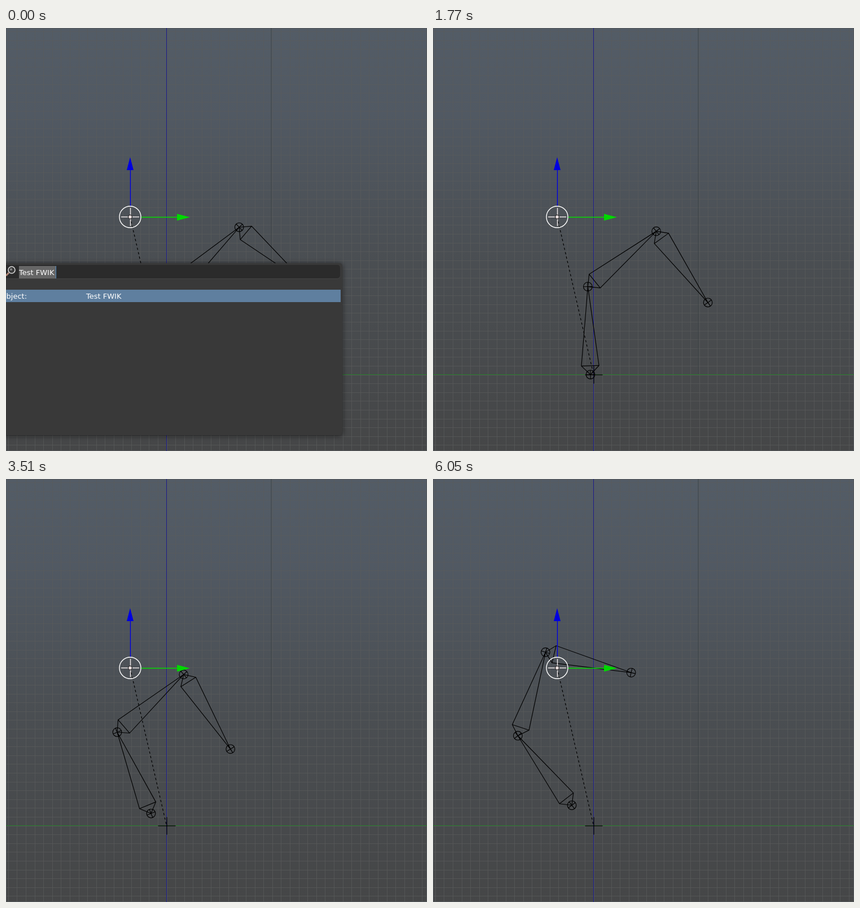
An HTML page with a canvas for the animation above (6410 ms loop, 746x750 px).

```html
<!DOCTYPE html>
<html lang="en">
<head>
<meta charset="utf-8">
<title>Armature solver</title>
<style>
  html, body { margin: 0; width: 100%; height: 100%; overflow: hidden; background: #4b4f54; }
  canvas { display: block; }
</style>
</head>
<body>
<canvas id="stage" width="746" height="750"></canvas>
<script>
const W = 746, H = 750, LOOP = 6410, BONE = 156, UNIT = 15.6;
const ORIGIN = { x: 284.5, y: 614.5 };
const TARGET = { x: 220, y: 335 };
const FONT = '13px "DejaVu Sans", sans-serif';
const ctx = document.getElementById('stage').getContext('2d');

// The picture refreshes in bursts: start, end, number of updates.
const BURSTS = [
  [320, 900, 6], [1010, 1650, 7], [1770, 2320, 6], [2460, 2990, 6], [3110, 3510, 5],
  [3650, 4290, 7], [4390, 4950, 6], [5070, 5620, 6], [5740, 6050, 4]
];
const TICKS = BURSTS.flatMap(([a, b, n]) =>
  Array.from({ length: n }, (_, i) => Math.round((a + (b - a) * i / (n - 1)) / 10) * 10));

// time, root x, root y, then the three bone angles in degrees
const POSES = [
  [320, 285, 615, -84.8, -43, 40.2],
  [780, 285, 615, -86, -42, 42.7],
  [1770, 279, 614.5, -91.7, -39, 54.1],
  [2460, 271, 610, -99.2, -37.5, 60.2],
  [3510, 257, 593, -112.6, -41, 57.9],
  [4290, 249, 581, -120.5, -50.6, 42],
  [4850, 245.5, 577.5, -125.2, -62.9, 24.2],
  [5620, 246, 578.5, -127.8, -71.7, 13.4]
];
// time, x, y
const POINTER = [
  [4290, -4, 446], [4850, 64, 428], [4950, 66, 428], [5620, 97, 414], [5950, 138, 355]
];

function slope(keys, i, c) {
  const a = keys[i - 1], b = keys[i + 1];
  return a && b ? (b[c] - a[c]) / (b[0] - a[0]) : 0;
}

// Cubic Hermite through the keys, at rest at both ends.
function sample(keys, t) {
  const last = keys.length - 1;
  if (t <= keys[0][0]) return keys[0].slice(1);
  if (t >= keys[last][0]) return keys[last].slice(1);
  const i = keys.findIndex(k => k[0] > t) - 1;
  const a = keys[i], b = keys[i + 1], d = b[0] - a[0];
  const u = (t - a[0]) / d, u2 = u * u, u3 = u2 * u;
  return a.slice(1).map((v, n) => {
    const c = n + 1;
    return v * (2 * u3 - 3 * u2 + 1) + b[c] * (3 * u2 - 2 * u3) +
      d * (slope(keys, i, c) * (u3 - 2 * u2 + u) + slope(keys, i + 1, c) * (u3 - u2));
  });
}

function line(color, ...p) {
  ctx.strokeStyle = color;
  ctx.beginPath();
  for (let i = 0; i < p.length; i += 2) ctx.lineTo(p[i], p[i + 1]);
  ctx.stroke();
}

function shape(color, ...p) {
  ctx.fillStyle = color;
  ctx.beginPath();
  for (let i = 0; i < p.length; i += 2) ctx.lineTo(p[i], p[i + 1]);
  ctx.closePath();
  ctx.fill();
}

function disc(x, y, r, stroke, fill) {
  ctx.beginPath();
  ctx.arc(x, y, r, 0, Math.PI * 2);
  if (fill) { ctx.fillStyle = fill; ctx.fill(); }
  if (stroke) { ctx.strokeStyle = stroke; ctx.stroke(); }
}

function panel(x, y, w, h, r, fill) {
  ctx.fillStyle = fill;
  ctx.beginPath();
  ctx.roundRect(x, y, w, h, r);
  ctx.fill();
}

function drawViewport() {
  const g = ctx.createLinearGradient(0, 0, 0, H);
  g.addColorStop(0, '#535c66');
  g.addColorStop(0.2, '#515963');
  g.addColorStop(0.55, '#4a4e52');
  g.addColorStop(1, '#454647');
  ctx.fillStyle = g;
  ctx.fillRect(0, 0, W, H);

  ctx.lineWidth = 1;
  const grid = 'rgba(90,92,92,0.7)';
  for (let k = -18; k <= 29; k++) {
    const x = Math.round(ORIGIN.x + k * UNIT) + 0.5;
    line(grid, x, 0, x, H);
  }
  for (let k = -39; k <= 8; k++) {
    const y = Math.round(ORIGIN.y + k * UNIT) + 0.5;
    line(grid, 0, y, W, y);
  }
  ctx.strokeStyle = '#55595c';
  ctx.strokeRect(0.5, 0.5, W - 1, H - 1);
  line('#3f4447', 470, 0, 470, ORIGIN.y);
  line('#277a2b', 0, ORIGIN.y, W, ORIGIN.y);
  line('#1b1b8e', ORIGIN.x, 0, ORIGIN.x, H);
}

function drawBall(x, y, angle) {
  const r = BONE * 0.05, c = Math.cos(angle) * r, s = Math.sin(angle) * r;
  disc(x, y, r, '#000');
  line('#000', x - c, y - s, x + c, y + s);
  line('#000', x + s, y - c, x - s, y + c);
}

function drawArm(t) {
  let [x, y, ...angles] = sample(POSES, t);
  angles = angles.map(a => a * Math.PI / 180);
  ctx.lineWidth = 1.15;
  drawBall(x, y, angles[0]);
  for (const a of angles) {
    const c = Math.cos(a), s = Math.sin(a), w = BONE * 0.1;
    const lx = x + (c + s) * w, ly = y + (s - c) * w;
    const rx = x + (c - s) * w, ry = y + (s + c) * w;
    const ex = x + c * BONE, ey = y + s * BONE;
    line('#000', x, y, lx, ly, ex, ey, rx, ry, x, y);
    line('#000', lx, ly, rx, ry);
    drawBall(ex, ey, a);
    x = ex;
    y = ey;
  }
}

function drawTarget() {
  const { x, y } = TARGET, o = ORIGIN;
  ctx.lineWidth = 1.2;
  line('#000', o.x - 15, o.y + 0.5, o.x + 16, o.y + 0.5);
  line('#000', o.x + 0.5, o.y - 15, o.x + 0.5, o.y + 16);
  ctx.setLineDash([4, 4]);
  line('#000', x, y, o.x, o.y);
  ctx.setLineDash([]);

  ctx.lineWidth = 1.4;
  line('#0000e0', x + 0.5, y - 19, x + 0.5, y - 83);
  shape('#0000e0', x, y - 106, x - 6, y - 83, x + 6, y - 83);
  line('#00d800', x + 19, y + 0.5, x + 83, y + 0.5);
  shape('#00d800', x + 106, y + 0.5, x + 83, y - 5.5, x + 83, y + 6.5);

  disc(x, y, 19, '#fff');
  line('#f4eeee', x - 16, y, x + 16, y);
  line('#f4eeee', x + 0.5, y - 16, x + 0.5, y + 16);
  ctx.lineWidth = 1;
  disc(x, y, 3.5, '#000', '#e8dede');
}

function drawPointer(t) {
  if (t < 4290 || t >= 6000) return;
  const [x, y] = sample(POINTER, t);
  ctx.save();
  ctx.translate(x, y);
  const outline = [0, 0, 0, 20.5, 4.7, 16.5, 8.2, 24.5, 11.8, 23, 8.3, 15, 14.3, 14.5];
  ctx.lineWidth = 1;
  ctx.lineJoin = 'round';
  shape('#f8f8f8', ...outline);
  line('#4a4a4a', ...outline, 0, 0);
  ctx.restore();
}

function drawSearch() {
  ctx.save();
  ctx.shadowColor = 'rgba(0,0,0,0.6)';
  ctx.shadowBlur = 10;
  ctx.shadowOffsetY = 1;
  panel(-20, 417, 616, 305, 5, '#393939');
  ctx.restore();

  panel(-20, 421, 612, 24, 5, '#444');
  panel(-20, 420, 612, 24, 5, '#2b2b2b');
  ctx.fillStyle = '#666';
  ctx.fillRect(23, 422, 65, 22);
  ctx.fillStyle = '#4f88bd';
  ctx.fillRect(88, 422, 1, 22);
  ctx.fillStyle = '#5f7f9f';
  ctx.fillRect(0, 464, 593, 22);

  // magnifier
  ctx.lineWidth = 3;
  line('#b58a78', 0, 439, 5, 434);
  ctx.lineWidth = 1.6;
  disc(10, 429, 6, '#d8d8d8', '#3a3a3a');
  ctx.lineWidth = 1;
  disc(9, 428, 2, null, '#8a8a8a');

  ctx.font = FONT;
  ctx.fillStyle = '#fff';
  ctx.fillText('Test FWIK', 23, 438);
  ctx.fillText('Object:', -9.7, 480);
  ctx.fillText('Test FWIK', 142, 480);
}

function render(now) {
  const time = now % LOOP;
  const t = TICKS.reduce((held, tick) => tick <= time ? tick : held, 0);
  drawViewport();
  drawArm(t);
  drawTarget();
  drawPointer(t);
  if (t < 320) drawSearch();
}

const start = performance.now();
(function frame() {
  render(performance.now() - start);
  requestAnimationFrame(frame);
})();
</script>
</body>
</html>
```
